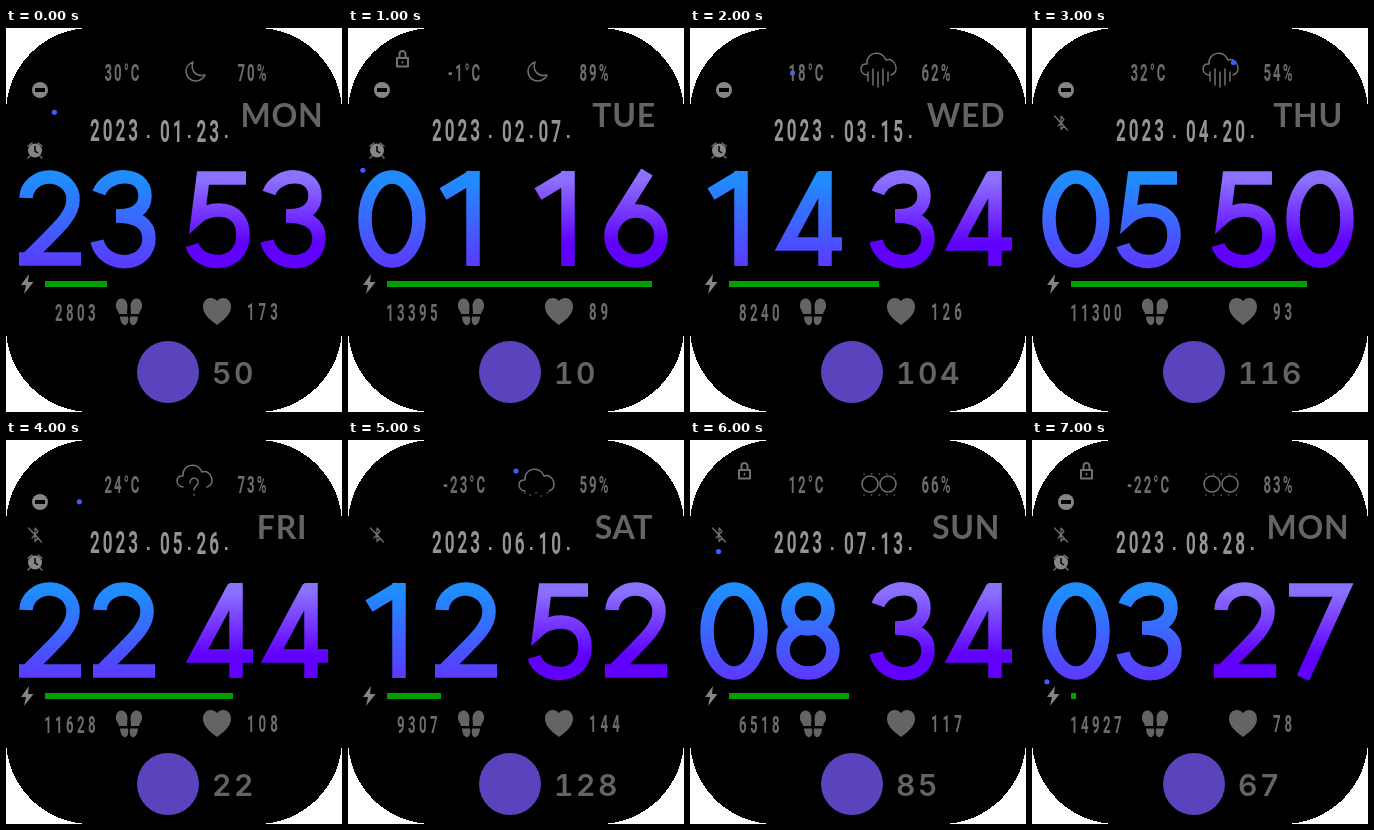
Animation, 336 px wide and 384 px high, one loop 8000 ms. Source, as an HTML page:

```html
<!DOCTYPE html>
<html lang="en">
<head>
<meta charset="utf-8">
<title>Watch face</title>
<style>
  html, body { margin: 0; width: 100%; height: 100%; overflow: hidden; background: #fff; }
  svg { display: block; width: 336px; height: 384px; }
  .narrow { font-family: Roboto, sans-serif; font-weight: 700; }
  .day { font: 700 32px Lato, sans-serif; letter-spacing: .7px; fill: #646467; text-anchor: middle; }
  .score { font: 600 30px Inter, sans-serif; font-variant-numeric: tabular-nums; letter-spacing: 2.6px; fill: #646467; }
  .line { fill: none; stroke: #707070; stroke-width: 1.5; stroke-linecap: round; stroke-linejoin: round; }
  .digit { fill: none; stroke-width: 13.5; }
</style>
</head>
<body>
<svg viewBox="0 0 336 384">
  <defs>
    <linearGradient id="hours" gradientUnits="userSpaceOnUse" x1="0" y1="0" x2="0" y2="98">
      <stop offset=".1" stop-color="#208cff"/><stop offset="1" stop-color="#5c38ff"/>
    </linearGradient>
    <linearGradient id="minutes" gradientUnits="userSpaceOnUse" x1="0" y1="0" x2="0" y2="98">
      <stop offset=".1" stop-color="#8c70ff"/><stop offset=".75" stop-color="#6000ff"/>
    </linearGradient>
  </defs>
  <rect width="336" height="384" rx="85" shape-rendering="crispEdges"/>
  <g id="face"></g>
  <path fill="#858585" d="M23 246L15 257H20L18 266L27.500 254H22Z"/>
  <g fill="#646467">
    <path d="M211 297C204 292 197 286 197 279C197 269 207 268 211 273C215 268 225 269 225 279C225 286 218 292 211 297Z"/>
    <path id="shoe" d="M110 279C109 268 121 268 121.500 278L121 286H113C112.500 283 110.500 282 110 279ZM114 288.500H122C124 300 114.500 300 114 288.500Z"/>
    <use href="#shoe" transform="matrix(-1 0 0 1 246 0)"/>
  </g>
  <circle cx="162" cy="344" r="31" fill="#5a43bd"/>
</svg>
<script>
const face = document.getElementById('face');

// Centre lines of the large digits, in a box 98 high centred on x = 0
const bowl = 'M-25 66A25 25 0 1 1 25 66A25 25 0 1 1 -25 66';
const digits = [
  'M-27 49A27 42 0 1 1 27 49A27 42 0 1 1 -27 49',
  'M7 96V1M-23 24L7 6',
  'M-24 28A23.500 22 0 0 1 23 30C23 45 10 56 -22 88M-31 89H31',
  'M-25 23C-18 2 21 0 21 26C21 38 12 46 -8 46C14 46 25 54 25 68C25 98 -20 100 -27 71',
  'M34 74H-22L15 5M17 96V1',
  'M27 8H-16L-21 47C-10 37 24 34 24 65C24 99 -20 98 -27 75',
  bowl + 'M11 2L-21 53',
  'M-31 8H23L-17 96',
  'M-20 27A20 20 0 1 1 20 27A20 20 0 1 1 -20 27M-25 68A25 23 0 1 1 25 68A25 23 0 1 1 -25 68',
  bowl + 'M11 2L-21 53'
];

const line = d => `<path class="line" d="${d}"/>`;
const cloud = line('M177 47C169 46 169 35 177 36C176 23 193 22 196 32C206 29 210 45 201 47');
const weather = {
  moon: line('M187 34C176 38 179 53 190 53C194 53 198 50 199 47C190 49 184 43 187 34Z'),
  rain: cloud + line('M178 44V53M183 41V57M188 44V59M193 41V57M198 44V53'),
  unknown: cloud + line('M184 43C184 36 193 37 192 43C192 46 188 46 188 50M188 54.500V55'),
  snow: `<g transform="translate(0 4)">${cloud}</g>` +
    line('M177 53h.1M182 55h.1M188 53h.1M193 56h.1M199 53h.1'),
  haze: line('M172 44A8 8 0 1 1 188 44A8 8 0 1 1 172 44M190 44A8 8 0 1 1 206 44A8 8 0 1 1 190 44') +
    '<path class="line" stroke-dasharray=".1 7.500" d="M174 34H206M174 55H206"/>'
};

const icons = {
  L: '<path class="line" style="stroke-width:2" d="M49 30H60V38.500H49ZM51.500 29V26A3 3 0 0 1 57.500 26V29M54.500 34V34.500"/>',
  D: '<circle cx="34" cy="62" r="8" fill="#858585"/><path d="M29 60H39V64H29Z"/>',
  B: '<path class="line" style="stroke-width:1.200" d="M26 91.500L32 98L29 101.500V88L32 91.500L26 98M22.500 88L35.500 102"/>',
  A: '<circle cx="29" cy="122.500" r="7" fill="#858585"/>' +
    line('M22 118L26 115M36 118L32 115M24 128L22 130M34 128L36 130') +
    '<path fill="none" stroke="#000" stroke-width="1.500" d="M29 118V123L32 125"/>'
};

// time, date, weekday, temperature, weather, humidity, steps, pulse, score, battery width, seconds, icons
const states = [
  ['2353', '01.23', 'MON', '30', 'moon', 70, 2803, 173, 50, 62, 52, 'DA'],
  ['0116', '02.07', 'TUE', '-1', 'moon', 89, 13395, 89, 10, 265, 48, 'LDA'],
  ['1434', '03.15', 'WED', '18', 'rain', 62, 8240, 126, 104, 150, 56, 'DA'],
  ['0550', '04.20', 'THU', '32', 'rain', 54, 11300, 93, 116, 236, 2, 'DB'],
  ['2244', '05.26', 'FRI', '24', 'unknown', 73, 11628, 108, 22, 188, 54, 'DBA'],
  ['1252', '06.10', 'SAT', '-23', 'snow', 59, 9307, 144, 128, 54, 0, 'B'],
  ['0834', '07.13', 'SUN', '12', 'haze', 66, 6518, 117, 85, 120, 50, 'LB'],
  ['0327', '08.28', 'MON', '-22', 'haze', 83, 14927, 78, 67, 5, 42, 'LDBA']
];

function narrow(x, y, text, { size = 24, gap = 2, anchor = 'start', fill = '#6c6c6c' } = {}) {
  const squeeze = .55;
  return `<text class="narrow" transform="translate(${x} ${y}) scale(${squeeze} 1)" text-anchor="${anchor}"
    style="font-size:${size}px;letter-spacing:${gap / squeeze}px;fill:${fill}">${text}</text>`;
}

function bigDigit(n, i) {
  const x = [44, 118, 213, 288][i];
  const flip = n === '9' ? ' rotate(180 0 49)' : '';
  return `<g transform="translate(${x} 142)${flip}">
    <path class="digit" stroke="url(#${i < 2 ? 'hours' : 'minutes'})" d="${digits[n]}"/></g>`;
}

function draw([time, date, day, temp, sky, humidity, steps, pulse, score, battery, seconds, shown]) {
  const [month, dayOfMonth] = date.split('.');
  const angle = seconds * Math.PI / 30;
  const dateStyle = { size: 31, gap: 3, fill: '#949494' };
  const dots = [142, 183, 220].map(x => `<rect x="${x - 1}" y="107" width="2.500" height="3" fill="#949494"/>`);
  face.innerHTML = [
    weather[sky],
    `<circle cx="${168 + 161 * Math.sin(angle)}" cy="${192 - 161 * Math.cos(angle)}" r="2.600" fill="#3c5cff"/>`,
    ...[...shown].map(key => icons[key]),
    narrow(117, 53, temp + '°C', { anchor: 'middle' }),
    narrow(231.5, 53, humidity + '%'),
    narrow(84, 113, '2023', dateStyle),
    narrow(154, 114, month, dateStyle),
    narrow(190.5, 114, dayOfMonth, dateStyle),
    ...dots,
    `<text class="day" x="276" y="99">${day}</text>`,
    ...[...time].map(bigDigit),
    `<rect x="39" y="253" width="${battery}" height="6" fill="#00a000"/>`,
    narrow(93, 293, steps, { gap: 3.4, anchor: 'end' }),
    narrow(241, 292, pulse, { gap: 4 }),
    `<text class="score" x="206" y="356">${score}</text>`
  ].join('');
}

let current = -1;
function tick() {
  const index = Math.floor(performance.now() / 1000) % states.length;
  if (index !== current) draw(states[current = index]);
  requestAnimationFrame(tick);
}
tick();
</script>
</body>
</html>
```
